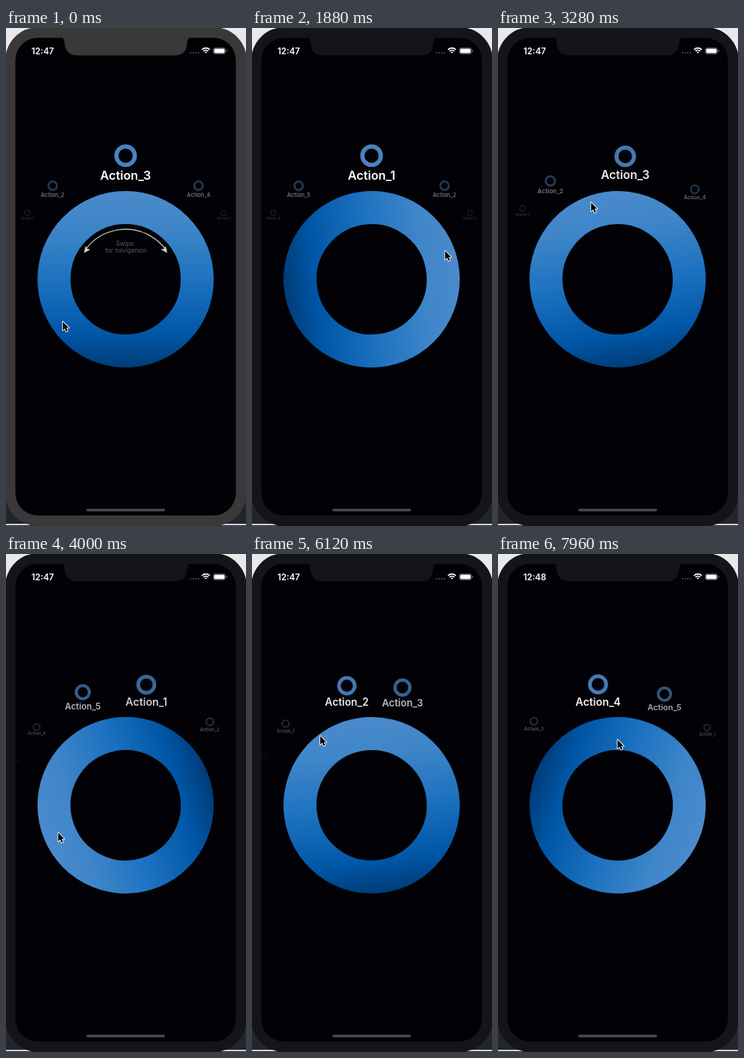
Write an HTML page with a canvas that moves like this. It is 320 px wide and 663 px high and loops after 8 s.

```html
<!DOCTYPE html>
<html lang="en">
<head>
<meta charset="utf-8">
<title>Ring navigation</title>
<style>
html, body { margin: 0; width: 100%; height: 100%; overflow: hidden; background: #000; }
canvas { display: block; width: 320px; height: 663px; }
</style>
</head>
<body>
<canvas id="stage"></canvas>
<script>
const W = 320, H = 663, LOOP = 8000, CX = 159.5, CY = 334.5;
const FONT = 'Inter, Roboto, sans-serif';
const canvas = document.getElementById('stage');
const ctx = canvas.getContext('2d');
const dpr = window.devicePixelRatio || 1;
canvas.width = W * dpr;
canvas.height = H * dpr;

// Ends of the swipes; pos is the action in the middle, angles are clockwise from the top
const POSES = [
  { time: 0, pos: 3, ring: 0, angle: -124, radius: 101 },
  { time: 1900, pos: 1, ring: 84, angle: 69, radius: 105 },
  { time: 3280, pos: 2.85, ring: -8, angle: -19, radius: 108 },
  { time: 4050, pos: 5.62, ring: -108, angle: -113, radius: 97 },
  { time: 5010, pos: -.18, ring: 92, angle: 32, radius: 97 },
  { time: 6170, pos: 2.49, ring: -8, angle: -37, radius: 115 },
  { time: LOOP, pos: -.62, ring: 108, angle: 0, radius: 87 }
];

const clamp = (v, a, b) => Math.min(b, Math.max(a, v));
const rad = deg => deg * Math.PI / 180;

function smooth(a, b, v) {
  const u = clamp((v - a) / (b - a), 0, 1);
  return u * u * (3 - 2 * u);
}

const segmentAt = t => POSES.findIndex((p, i) => i > 0 && t <= p.time) - 1;

// Monotone cubic through the poses: rests where the direction turns
function track(key, t) {
  const i = segmentAt(t), from = POSES[i], to = POSES[i + 1];
  const slope = k => k < 0 || k > POSES.length - 2 ? 0
    : (POSES[k + 1][key] - POSES[k][key]) / (POSES[k + 1].time - POSES[k].time);
  const tangent = k => {
    const a = slope(k - 1), b = slope(k);
    return a * b <= 0 ? 0 : 2 * a * b / (a + b);
  };
  const span = to.time - from.time, u = (t - from.time) / span;
  return from[key] + (to[key] - from[key]) * smooth(0, 1, u)
    + span * u * (1 - u) * (tangent(i) * (1 - u) - tangent(i + 1) * u);
}

// Falls by `near` up to the next slot with a soft step of `drop`, then by `far` per slot
function profile(d, top, near, drop, far) {
  return top - near * Math.min(d, 1) - drop * smooth(.45, .75, d) - far * Math.max(d - 1, 0);
}

function text(str, x, y, size, color, weight = 400) {
  ctx.font = `${weight} ${size}px ${FONT}`;
  ctx.fillStyle = color;
  ctx.textAlign = 'center';
  ctx.textBaseline = 'alphabetic';
  ctx.fillText(str, x, y + size * .36);
}

function box(x, y, w, h, r, color) {
  ctx.fillStyle = color;
  ctx.beginPath();
  ctx.roundRect(x, y, w, h, r);
  ctx.fill();
}

function circle(x, y, r, width, color) {
  ctx.strokeStyle = color;
  ctx.lineWidth = width;
  ctx.beginPath();
  ctx.arc(x, y, r, 0, 7);
  ctx.stroke();
}

function drawPhone(t) {
  const fade = clamp((t - 40) / 500, 0, 1);
  const mix = (a, b) => a + (b - a) * fade;
  const bezel = `rgb(${mix(58, 21)},${mix(56, 20)},${mix(56, 24)})`;
  box(0, 0, W, H / 2, 0, '#e9e9ec');
  box(0, H / 2, W, H / 2, 0, '#24242b');
  box(0, 660, W, 2, 0, '#d4d4d8');
  box(-1, -1, 322, 664, 44, bezel);
  box(12.5, 13, 294, 636, 30, '#020206');
  ctx.fillStyle = bezel;
  ctx.beginPath();
  ctx.moveTo(72, 12);
  ctx.quadraticCurveTo(78, 13, 78, 19);
  ctx.quadraticCurveTo(79, 36.5, 95, 36.5);
  ctx.lineTo(225, 36.5);
  ctx.quadraticCurveTo(241, 36.5, 241.5, 19);
  ctx.quadraticCurveTo(242, 13, 248, 12);
  ctx.fill();
  box(107, 640, 105, 3.5, 1.75, '#48484b');
}

function drawStatus(t) {
  text(t < 7760 ? '12:47' : '12:48', 49, 30.5, 11.5, '#fff', 600);
  for (let i = 0; i < 4; i++) box(245 + i * 3.5, 32, 2, 2, 1, '#555');
  ctx.strokeStyle = '#fff';
  ctx.lineWidth = 1.7;
  for (const r of [1.5, 4.5, 7.3]) {
    ctx.beginPath();
    ctx.arc(266.5, 34, r, rad(-135), rad(-45));
    ctx.stroke();
  }
  ctx.strokeStyle = '#777';
  ctx.lineWidth = .7;
  ctx.beginPath();
  ctx.roundRect(276.3, 26.5, 16.4, 8, 2.2);
  ctx.stroke();
  box(277.4, 27.6, 14.2, 5.8, 1.3, '#fff');
  box(293.6, 29.2, 1.2, 2.6, .6, '#777');
}

function drawRing(t) {
  ctx.save();
  ctx.translate(CX, CY);
  ctx.rotate(rad(track('ring', t)));
  const shade = ctx.createLinearGradient(0, -117.5, 0, 117.5);
  shade.addColorStop(0, '#4b8acb');
  shade.addColorStop(.2, '#3f86c9');
  shade.addColorStop(.52, '#1c71bf');
  shade.addColorStop(.82, '#0056a6');
  shade.addColorStop(1, '#003c78');
  circle(0, 0, 95.5, 44, shade);
  ctx.restore();
}

function drawHint(t) {
  ctx.save();
  ctx.globalAlpha = 1 - clamp((t - 250) / 250, 0, 1);
  text('Swipe', 158.5, 287, 8.3, '#58585b');
  text('for naviganion', 160, 296.5, 8.3, '#58585b');
  ctx.strokeStyle = ctx.fillStyle = '#d4d4d6';
  ctx.lineWidth = 1.2;
  ctx.beginPath();
  ctx.arc(CX, CY, 66.5, rad(-145), rad(-35));
  ctx.stroke();
  for (const side of [-1, 1]) {
    ctx.save();
    ctx.translate(CX + side * 55.5, 299.5);
    ctx.scale(side, 1);
    ctx.rotate(rad(53));
    ctx.beginPath();
    ctx.moveTo(0, 0);
    ctx.lineTo(-9, -4);
    ctx.lineTo(-7, 0);
    ctx.lineTo(-9, 4);
    ctx.fill();
    ctx.restore();
  }
  ctx.restore();
}

function drawActions(t) {
  const pos = track('pos', t), i = segmentAt(t);
  // Actions wrap late on the side they move towards
  const low = POSES[i + 1].pos > POSES[i].pos ? -3.5 : -2.3;
  ctx.save();
  ctx.beginPath();
  ctx.rect(12.5, 37, 294, 600);
  ctx.clip();
  for (let n = 1; n <= 5; n++) {
    const d = ((n - pos - low) % 5 + 5) % 5 + low, dist = Math.abs(d);
    if (d < -2.6 || d > 2.2) continue;
    const angle = rad(profile(dist, 0, -24, -14, -18)) * Math.sign(d);
    const radius = profile(dist, 164.5, 4, 2.5, 0);
    const scale = profile(dist, 1, .3, .24, .19);
    const dim = d > 0 ? .5 : .15;
    const x = CX + radius * Math.sin(angle), y = CY - radius * Math.cos(angle);
    ctx.globalAlpha = clamp(profile(dist, 1, dim, .57 - dim, .25), .1, 1);
    circle(x, y, 12.3 * scale, 5.6 * scale, '#4a82c0');
    text('Action_' + n, x, y + 26 * scale, 16.2 * scale, '#fff', 600);
  }
  ctx.restore();
}

function drawPointer(t) {
  const angle = rad(track('angle', t)), radius = track('radius', t);
  ctx.save();
  ctx.translate(CX + radius * Math.sin(angle), CY - radius * Math.cos(angle));
  ctx.scale(.88, .88);
  ctx.beginPath();
  [[0, 0], [0, 13], [3, 10.2], [5.2, 15], [7.4, 14], [5.3, 9.3], [9.3, 9.3]]
    .forEach(([x, y]) => ctx.lineTo(x, y));
  ctx.closePath();
  ctx.lineJoin = 'round';
  ctx.lineWidth = 2;
  ctx.strokeStyle = '#fff';
  ctx.stroke();
  ctx.fillStyle = '#000';
  ctx.fill();
  ctx.restore();
}

const start = performance.now();
function tick() {
  const t = (performance.now() - start) % LOOP;
  ctx.setTransform(dpr, 0, 0, dpr, 0, 0);
  [drawPhone, drawStatus, drawRing, drawHint, drawActions, drawPointer].forEach(draw => draw(t));
  requestAnimationFrame(tick);
}
tick();
</script>
</body>
</html>
```
